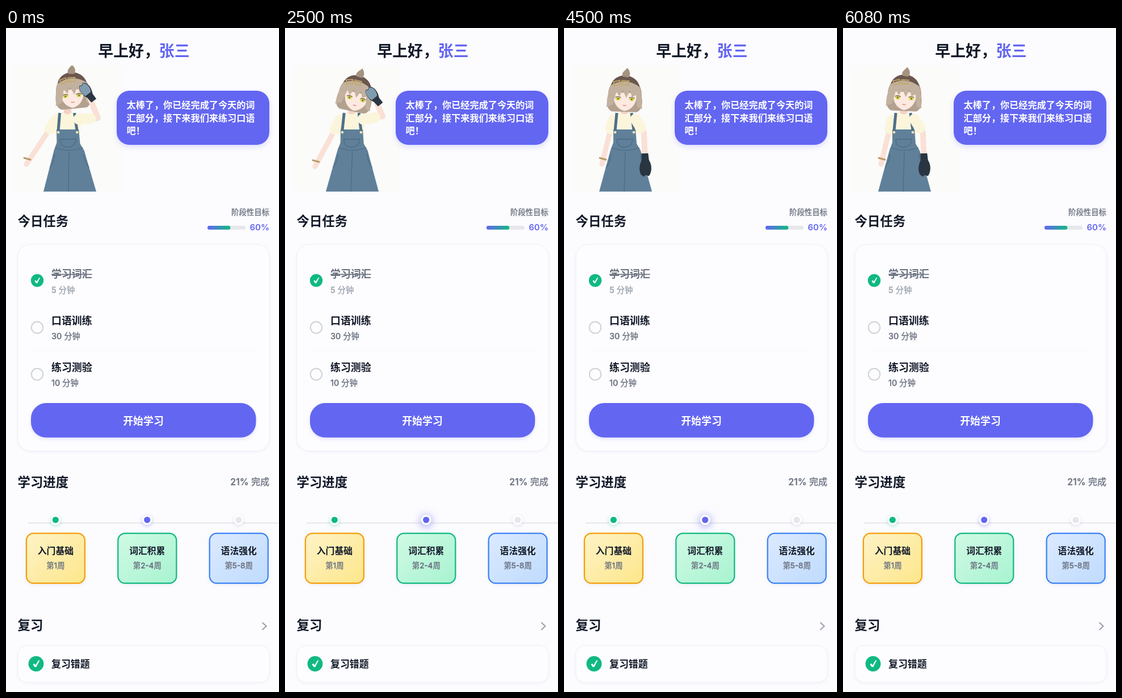
An HTML page that plays this animation: 481x1165 px, repeating every 6.16 s.

```html
<!DOCTYPE html>
<html lang="zh-CN">
<head>
<meta charset="utf-8">
<title>学习首页</title>
<style>
html, body { margin: 0; width: 100%; height: 100%; overflow: hidden; background: #fcfcff; }
svg { display: block; width: 481px; height: 1165px; }
text { font: 600 16px Inter, "Noto Sans CJK SC", "Noto Sans CJK", sans-serif; fill: #111827; }
.hello { font-size: 26.9px; font-weight: 700; }
.section { font-size: 22.4px; font-weight: 700; }
.task { font-size: 17.9px; }
.note, .small, .done { font-weight: 500; fill: #6b7280; stroke: #6b7280; stroke-width: .35px; }
.note { font-size: 14.4px; }
.small { font-size: 13.4px; }
.step { font-size: 15.8px; }
.speech { font-size: 16.15px; fill: #fff; }
.right { text-anchor: end; }
.mid { text-anchor: middle; }
.accent { fill: #6366f1; }
.white { fill: #fff; }
.panel { fill: #fdfdff; stroke: #f0f1f9; filter: drop-shadow(0 1px 2px rgba(40, 45, 110, .07)); }
.dot { stroke: #fff; stroke-width: 3.4; filter: drop-shadow(0 2px 3px rgba(40, 45, 90, .13)); }
.limb { fill: none; stroke-linecap: round; stroke-linejoin: round; }
</style>
</head>
<body>
<svg viewBox="0 0 481 1165">
  <defs>
    <linearGradient id="bar"><stop stop-color="#6366f1"/><stop offset="1" stop-color="#10b981"/></linearGradient>
    <linearGradient id="amber" x2="1" y2="1"><stop stop-color="#fef3c7"/><stop offset="1" stop-color="#fde68a"/></linearGradient>
    <linearGradient id="mint" x2="1" y2="1"><stop stop-color="#d1fae5"/><stop offset="1" stop-color="#a7f3d0"/></linearGradient>
    <linearGradient id="sky" x2="1" y2="1"><stop stop-color="#dbeafe"/><stop offset="1" stop-color="#bfdbfe"/></linearGradient>
    <clipPath id="stage"><rect x="12" y="66" width="192" height="221"/></clipPath>
    <g id="check">
      <circle r="11.2" fill="#10b981"/>
      <path d="M-4.6 .8L-2.4-.4L-.8 2L3.4-4.8L5.4-5.2L.2 4.8L-2 4.8Z" fill="#fff"/>
    </g>
  </defs>

  <text class="hello" x="162.3" y="50">早上好，<tspan class="accent">张三</tspan></text>

  <g clip-path="url(#stage)">
    <rect x="12" y="66" width="192" height="221" fill="#fbfbfa"/>
    <g>
      <path class="limb" id="leftFore" stroke="#fae0d5" stroke-width="9"/>
      <path class="limb" id="leftBand" stroke="#b99a6a" stroke-width="3"/>
      <path class="limb" id="leftSleeve" stroke="#fbf5dc" stroke-width="19"/>
    </g>
    <g id="body">
      <path d="M-7-148H5L7-130H-9Z" fill="#f3d3c6"/>
      <path d="M-26-132Q-18-139-9-139Q-1-132 6-139Q16-138 22-131L20-82H-22Z" fill="#fbf5dc"/>
      <path d="M-21-109H18L20-84L27-72L47 0H-46L-26-73L-21-86Z" fill="#60809a"/>
      <path d="M-15-138L-18-107M11-138L15-107" stroke="#4f708a" stroke-width="5"/>
      <path d="M-24-77Q0-68 25-77M-15-92Q-15-78-2-78Q12-78 13-92ZM-25-66Q-26-52-34-42M26-66Q27-52 35-42M0-70L-2 0" fill="none" stroke="#4c6c86" stroke-width="1.3"/>
      <circle cx="-18" cy="-104" r="2.3" fill="#eee3bd"/>
      <circle cx="15" cy="-104" r="2.3" fill="#eee3bd"/>
    </g>
    <g id="head">
      <path d="M-29 2C-30-39 32-39 30 4C34 18 30 28 23 31L-21 32C-31 28-32 16-29 2Z" fill="#b3a18f"/>
      <g id="face">
        <path d="M-21-2C-21 21-9 28 0 30C10 28 21 20 21-2Z" fill="#fde9e0"/>
        <g fill="#d5d64c"><ellipse cx="-12" cy="9" rx="4.2" ry="3"/><ellipse cx="12" cy="9" rx="4.2" ry="3"/></g>
        <g fill="#59613a"><circle cx="-12" cy="9" r="1.4"/><circle cx="12" cy="9" r="1.4"/></g>
        <path d="M-17 7Q-12 4-7 7M7 7Q12 4 17 7" fill="none" stroke="#7b675b" stroke-width="1.4"/>
        <path d="M-3 20Q0 21 3 20" fill="none" stroke="#dc8e88" stroke-width="1.5"/>
      </g>
      <path d="M-29 2C-28-37 30-37 29 4L32 25L23 22L20 1L13 5L9-7L3 7L-4-7L-9 5L-15-3L-20 20L-31 25Z" fill="#c2b19e"/>
      <path d="M-25-14C-20-38 19-39 26-13C9-25-10-24-25-14Z" fill="#6a574e"/>
      <path d="M-21-20l11-3 1 7-10 3ZM-6-23h12v7h-11Z" fill="none" stroke="#c6a768" stroke-width="1.8"/>
      <path d="M-5-30C-9-38 0-41 2-46C8-40 9-34 5-29Z" fill="#a5927f"/>
    </g>
    <g>
      <path class="limb" id="rightFore" stroke="#fae0d5" stroke-width="10"/>
      <path class="limb" id="rightSleeve" stroke="#fbf5dc" stroke-width="19"/>
      <g id="glove">
        <path d="M-20-6L-8-7C0-12 12-12 20-6L18 0L21 3L17 8C8 12 0 10-8 6L-20 6Z" fill="#293540"/>
        <path id="palm" d="M-3-8C4-11 12-11 19-6L17 0L20 3L16 7C9 10 2 9-3 5Z" fill="#809caf"/>
      </g>
    </g>
    <path id="cursor" d="M188 261v6l1.5-1.3 1.1 2.3 1-.5-1-2.2h1.8Z" fill="#111"/>
  </g>

  <g id="bubble">
    <rect x="195" y="110" width="269" height="95" rx="22.4" fill="#6366f1" style="filter:drop-shadow(0 4px 5px rgba(99,102,241,.2))"/>
    <text class="speech" x="212.5" y="141">太棒了，你已经完成了今天的词</text>
    <text class="speech" x="212.5" y="163.5">汇部分，接下来我们来练习口语</text>
    <text class="speech" x="212.5" y="186">吧！</text>
  </g>

  <text class="section" x="20.5" y="346.5">今日任务</text>
  <text class="small right" x="464" y="328">阶段性目标</text>
  <rect x="355" y="347" width="67" height="6.7" rx="3.3" fill="#e5e7eb"/>
  <rect x="355" y="347" width="40.3" height="6.7" rx="3.3" fill="url(#bar)"/>
  <text class="right accent" style="font-size:15px" x="464" y="355">60%</text>

  <rect class="panel" x="21" y="380" width="443" height="362" rx="22"/>
  <path d="M44 484.5H440M44 566.5H440" stroke="#f8f8fc"/>
  <use href="#check" x="55" y="443"/>
  <text class="task" x="80" y="438" style="fill:#6b7280;text-decoration:line-through">学习词汇</text>
  <text class="note" x="80" y="465" style="fill:#9ca3af;stroke:#9ca3af">5 分钟</text>
  <g fill="none" stroke="#d1d5db" stroke-width="2.2"><circle cx="55" cy="525.5" r="10.2"/><circle cx="55" cy="607.5" r="10.2"/></g>
  <text class="task" x="80" y="519.5">口语训练</text>
  <text class="note" x="80" y="546">30 分钟</text>
  <text class="task" x="80" y="601.5">练习测验</text>
  <text class="note" x="80" y="628">10 分钟</text>
  <rect x="44" y="658" width="396.5" height="60.6" rx="26.9" fill="#6366f1" style="filter:drop-shadow(0 3px 3px rgba(99,102,241,.16))"/>
  <text class="task mid white" x="242" y="695.5">开始学习</text>

  <text class="section" x="20.5" y="805">学习进度</text>
  <text class="done right" x="464" y="802">21% 完成</text>
  <path d="M38 868.5H481" stroke="#e5e7eb" stroke-width="2.2"/>
  <circle class="dot" cx="87.3" cy="863" r="7.3" fill="#10b981" style="filter:drop-shadow(0 2px 3px rgba(16,185,129,.3))"/>
  <circle class="dot" cx="248.7" cy="863" r="7.3" fill="#6366f1" id="pulse"/>
  <circle class="dot" cx="410" cy="863" r="7.3" fill="#e5e7eb"/>
  <g stroke-width="2.2" style="filter:drop-shadow(0 2px 3px rgba(40,45,90,.07))">
    <rect x="35.9" y="886.6" width="103" height="87.6" rx="12.5" fill="url(#amber)" stroke="#f59e0b"/>
    <rect x="197.3" y="886.6" width="103" height="87.6" rx="12.5" fill="url(#mint)" stroke="#10b981"/>
    <rect x="358.7" y="886.6" width="103" height="87.6" rx="12.5" fill="url(#sky)" stroke="#3b82f6"/>
  </g>
  <text class="step mid" x="87.4" y="923">入门基础</text><text class="small mid" x="87.4" y="948">第1周</text>
  <text class="step mid" x="248.8" y="923">词汇积累</text><text class="small mid" x="248.8" y="948">第2-4周</text>
  <text class="step mid" x="410.2" y="923">语法强化</text><text class="small mid" x="410.2" y="948">第5-8周</text>

  <text class="section" x="20.5" y="1056">复习</text>
  <path d="M451.5 1043L458.5 1049.5L451.5 1056" fill="none" stroke="#9ca3af" stroke-width="2.2"/>
  <rect class="panel" x="21" y="1084" width="443" height="64" rx="16"/>
  <use href="#check" transform="translate(53 1115.5) scale(1.2)"/>
  <text style="font-size:16.9px" x="80" y="1122">复习错题</text>
</svg>

<script>
const LOOP = 6160, BEAT = 2000;
const el = id => document.getElementById(id);
const mix = (a, b, k) => a + (b - a) * k;

// time, base x, lean, head x, y, tilt, right elbow x, y, right hand x, y, left hand x, y
const poses = [
  [0,    112, -1, 117, 110, -4, 162, 158, 144, 113, 36, 239],
  [830,  122,  1, 131, 114, 14, 188, 157, 160, 117, 55, 245],
  [1670, 125,  2, 131, 114, 16, 189, 155, 163, 116, 41, 233],
  [2500, 118, .5, 124, 115, 13, 172, 155, 157, 120, 53, 243],
  [3750, 108,  0, 106, 117,  2, 141, 184, 143, 240, 67, 239],
  [5250, 108,  0, 108, 114,  4, 141, 184, 143, 240, 67, 239],
  [6080, 108,  0, 108, 114,  4, 141, 184, 143, 240, 67, 239]
];

function poseAt(t) {
  const next = poses.findIndex(p => p[0] > t);
  if (next < 0) return poses.at(-1);
  const a = poses[next - 1], b = poses[next];
  const k = (t - a[0]) / (b[0] - a[0]), ease = k * k * (3 - 2 * k);
  return a.map((v, i) => mix(v, b[i], ease));
}

function line(id, x1, y1, x2, y2, from = 0, to = 1) {
  el(id).setAttribute("d",
    `M${mix(x1, x2, from)} ${mix(y1, y2, from)}L${mix(x1, x2, to)} ${mix(y1, y2, to)}`);
}

function drawFigure(t) {
  const [, x, lean, hx, hy, tilt, ex, ey, rx, ry, lx, ly] = poseAt(t);
  const place = (id, value) => el(id).setAttribute("transform", value);
  const top = x + 125 * Math.tan(lean * Math.PI / 180);
  place("body", `translate(${x} 287) skewX(${-lean})`);
  place("head", `translate(${hx} ${hy}) rotate(${tilt})`);
  place("face", `translate(${tilt * .25} 0)`);

  const sx = top - 22, sy = 161;
  line("leftFore", sx, sy, lx, ly);
  line("leftBand", lx - 4, ly - 11, lx + 7, ly - 8);
  line("leftSleeve", sx, sy, lx, ly, 0, .2);

  const shoulder = top + 18;
  line("rightSleeve", shoulder, 160, ex, ey, 0, .62);
  el("rightFore").setAttribute("d", `M${shoulder} 160L${ex} ${ey}L${rx} ${ry}`);
  const angle = Math.atan2(ry - ey, rx - ex) * 180 / Math.PI;
  const raised = Math.max(0, Math.min(1, (240 - ry) / 120));
  place("glove", `translate(${rx} ${ry}) rotate(${angle - 15 * raised}) scale(${1 - .1 * raised})`);
  el("palm").setAttribute("opacity", raised);
  el("cursor").style.display = t >= 5080 && t < 5750 ? "" : "none";
}

function drawPulses(t) {
  const phase = t % BEAT;
  const glow = ((1 + Math.cos((phase - 650) / BEAT * 2 * Math.PI)) / 2) ** 2;
  el("pulse").style.filter =
    `drop-shadow(0 ${mix(2, 3, glow)}px ${mix(3, 8, glow)}px rgba(99,102,241,${mix(.35, .8, glow)}))`;

  const offset = Math.min(1, Math.abs(phase - 1600) / 220);
  const dip = (1 + Math.cos(offset * Math.PI)) / 2;
  const bubble = el("bubble");
  bubble.setAttribute("transform",
    `translate(329.5 157.5) scale(${1 - .045 * dip}) translate(-329.5 -157.5)`);
  bubble.setAttribute("opacity", 1 - .25 * dip);
}

function frame() {
  const t = performance.now() % LOOP;
  drawFigure(t);
  drawPulses(t);
  requestAnimationFrame(frame);
}
frame();
</script>
</body>
</html>
```
